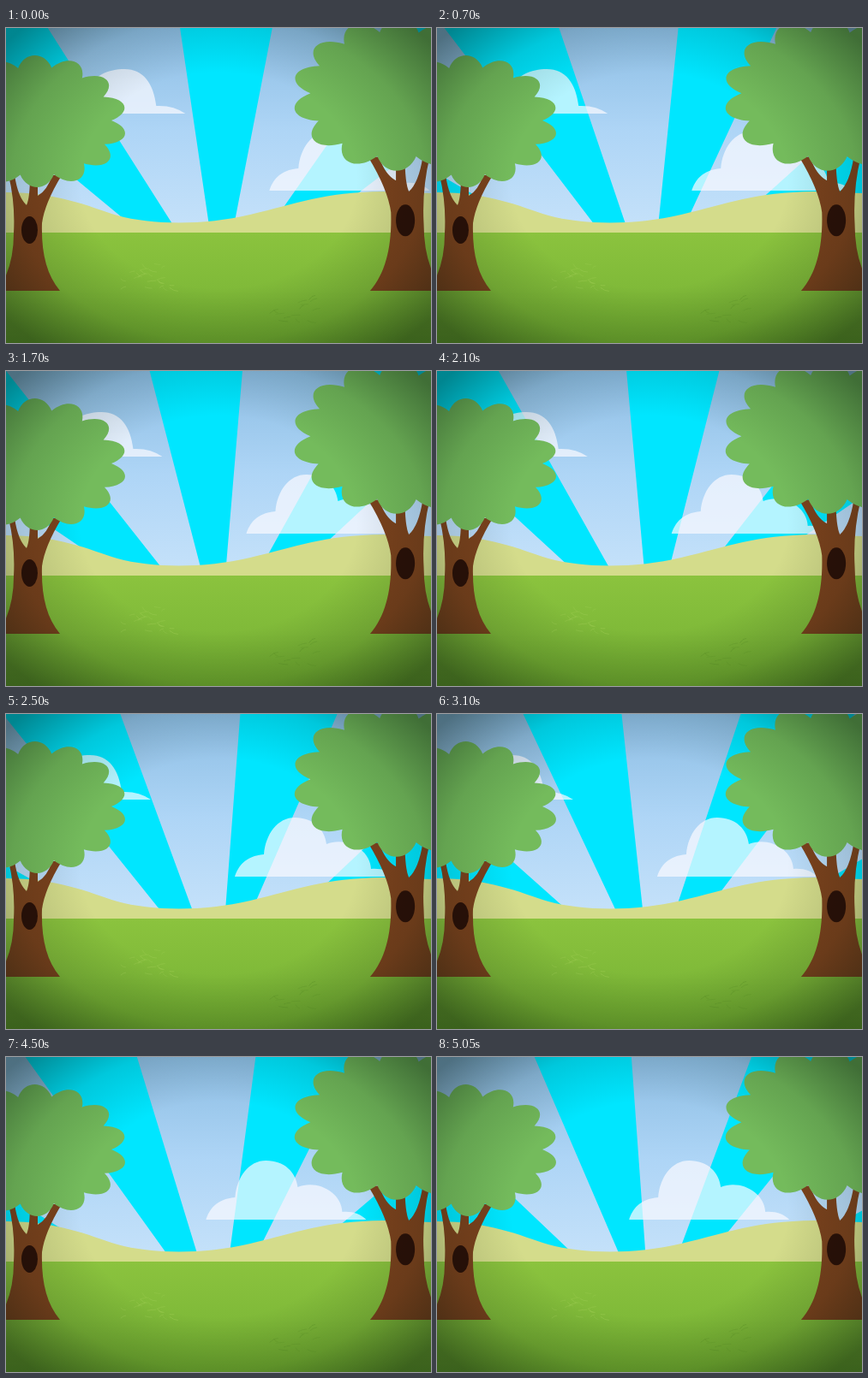
An HTML page that plays this animation: 496 px wide and 368 px high, repeating every 5.1 s.

```html
<!DOCTYPE html>
<html lang="en">
<head>
<meta charset="utf-8">
<title>Sunny meadow</title>
<style>
html, body { margin: 0; width: 100%; height: 100%; overflow: hidden; background: #7ab23c; }
svg { display: block; width: 496px; height: 368px; }
</style>
</head>
<body>
<svg viewBox="0 0 496 368">
  <defs>
    <linearGradient id="sky" x2="0" y2="1">
      <stop offset="0" stop-color="#8cbde3"/>
      <stop offset=".5" stop-color="#aed5f6"/>
      <stop offset="1" stop-color="#c6e2fa"/>
    </linearGradient>
    <linearGradient id="grass" x2="0" y2="1">
      <stop offset="0" stop-color="#8bc33e"/>
      <stop offset=".5" stop-color="#80ba39"/>
      <stop offset="1" stop-color="#6ba42d"/>
    </linearGradient>
    <radialGradient id="shade" gradientUnits="userSpaceOnUse" cx="0" cy="0" r="1"
      gradientTransform="translate(248 178) scale(322 252)">
      <stop offset=".5" stop-color="#001008" stop-opacity="0"/>
      <stop offset=".75" stop-color="#001008" stop-opacity=".14"/>
      <stop offset="1" stop-color="#001008" stop-opacity=".45"/>
    </radialGradient>
    <g id="tree">
      <path fill="#7b421d" d="M3,172H10Q14,198 24,207Q28,198 28,172H37V196Q48,190 54,172H65Q45,205 42,228C41,262 47,288 63,307H-10Q9,280 9,240Q11,205 3,172Z"/>
      <ellipse cx="27.500" cy="236" rx="9.500" ry="16" fill="#2b1008"/>
      <path id="leaves" fill="#74bb5c"/>
    </g>
  </defs>
  <rect width="496" height="240" fill="url(#sky)"/>
  <path id="rays" fill="#00e6ff"/>
  <g id="clouds" fill="#fafaff" fill-opacity=".72">
    <path d="M0,190C4,178 12,166 34,164C36,140 50,121 70,121C92,121 105,135 107,152C130,143 158,158 159,181C170,180 180,183 187,190Z"/>
    <path d="M-98,100Q-112,90 -132,91C-135,65 -147,48 -169,48C-187,48 -207,55 -212,75L-245,100Z"/>
  </g>
  <path fill="#d4dc8b" d="M0,192C60,192 95,208 130,219C170,230 230,231 285,218C340,205 370,192 440,191L496,193V240H0Z"/>
  <rect y="239" width="496" height="129" fill="url(#grass)"/>
  <g id="blades" fill="none" stroke-linecap="round"/>
  <use href="#tree"/>
  <use href="#tree" transform="translate(498 -49) scale(-1.16 1.16)"/>
  <rect width="496" height="368" fill="url(#shade)"/>
</svg>
<script>
const LOOP = 5100, STEP = 50;
const RAYS = 9, SPACING = 360 / RAYS, HALF_RAY = 8.8;
const $ = id => document.getElementById(id);
const rad = degrees => degrees * Math.PI / 180;

// A ring of leaves on an ellipse; each leaf is one cubic from notch to notch.
function canopy(cx, cy, rx, ry, count, first) {
  const point = (degrees, r) =>
    [cx + rx * r * Math.cos(rad(degrees)), cy + ry * r * Math.sin(rad(degrees))];
  const step = 360 / count, notch = .83, pinch = .6;
  let d = `M${point(first - step / 2, notch)}`;
  for (let i = 0; i < count; i++) {
    const angle = first + i * step;
    const a = point(angle - step / 2, notch), b = point(angle + step / 2, notch);
    const tip = point(angle, 1);
    const mid = a.map((v, k) => (v + b[k]) / 2);
    const control = p =>
      p.map((v, k) => mid[k] + (tip[k] - mid[k]) * 4 / 3 + (v - mid[k]) * pinch);
    d += `C${control(a)} ${control(b)} ${b}`;
  }
  return d + 'Z';
}

function sunRays() {
  let d = '';
  for (let i = 0; i < RAYS; i++) {
    const edge = side => {
      const a = rad(i * SPACING + side * HALF_RAY);
      return `${900 * Math.sin(a)},${-900 * Math.cos(a)}`;
    };
    d += `M0,0L${edge(-1)}L${edge(1)}Z`;
  }
  return d;
}

let seed = 7;
const random = () => (seed = seed * 16807 % 2147483647) / 2147483647;

function scatter(count, x, y, w, h, color) {
  for (let i = 0; i < count; i++) {
    const px = x + (random() - .5) * w, py = y + (random() - .5) * h;
    const dx = 4 + random() * 6, dy = (random() - .5) * 10;
    const blade = document.createElementNS('http://www.w3.org/2000/svg', 'path');
    blade.setAttribute('d', `M${px},${py}q${dx / 2},${dy} ${dx},${dy}`);
    blade.setAttribute('stroke', color);
    blade.setAttribute('stroke-opacity', .2 + random() * .2);
    $('blades').append(blade);
  }
}

$('leaves').setAttribute('d', canopy(35, 109, 106, 77, 14, 12));
$('rays').setAttribute('d', sunRays());
scatter(22, 165, 289, 62, 38, '#a9d35d');
scatter(14, 330, 328, 60, 28, '#5d9428');

function draw(time) {
  // The drift starts a little ahead and settles to a steady pace.
  const t = time + Math.max(0, 100 - time / 7);
  const turn = t * .02147 - .95;
  $('rays').setAttribute('transform', `translate(249.5 316) scale(1.1 1) rotate(${turn})`);
  $('clouds').setAttribute('transform', `translate(${309 - t * .0168})`);
}

const start = performance.now();
function tick() {
  const time = (performance.now() - start) % LOOP;
  draw(Math.floor(time / STEP) * STEP);
  requestAnimationFrame(tick);
}
tick();
</script>
</body>
</html>
```
